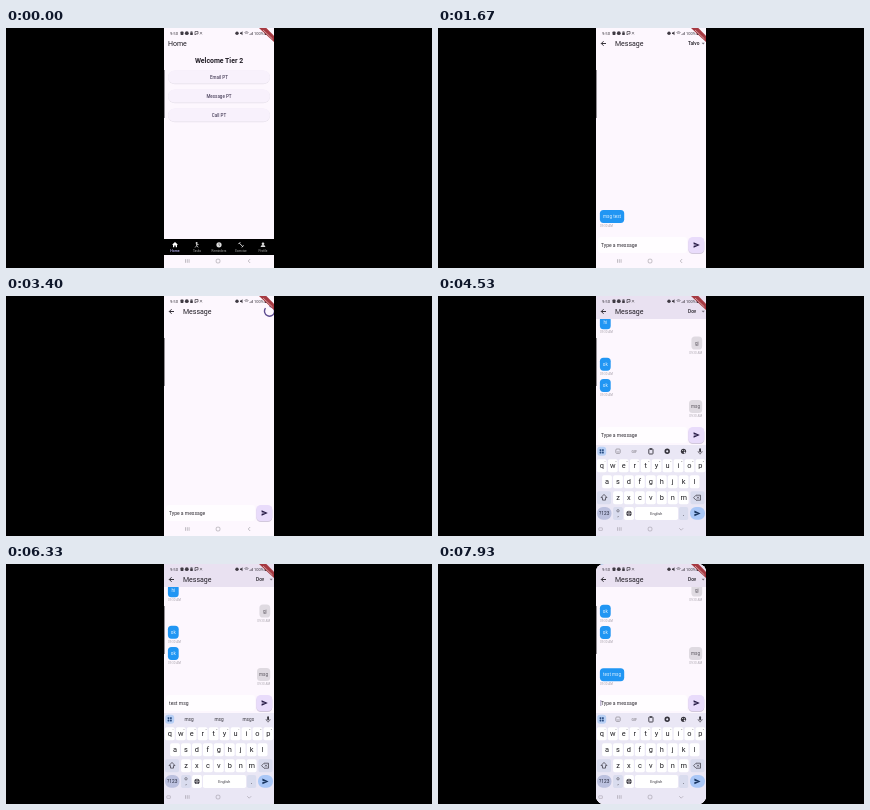
Animation, 426 px wide and 240 px high, one loop 8 s. Source, as an HTML page:

```html
<!DOCTYPE html>
<html lang="en">
<head>
<meta charset="utf-8">
<title>Messaging demo</title>
<style>
html, body { margin: 0; width: 100%; height: 100%; overflow: hidden; background: #000; }
svg { display: block; width: 100%; height: 100%; }
text { font-family: Roboto, Arial, sans-serif; white-space: pre; }
</style>
</head>
<body>
<svg id="stage" viewBox="0 0 426 240"></svg>
<script>
const LOOP = 8000;
const INK = '#211d25', PAGE = '#fdf7fe', BLUE = '#2196f3';
const T = { chat: 900, first: 1150, reload: 3200, second: 3600, keys: 4130, sent: 6850, corners: 7870 };
const TYPING = [[4850, 't'], [5000, 'te'], [5150, 'tes'], [5300, 'test'], [5450, 'test '],
  [5750, 'test m'], [5900, 'test ms'], [6050, 'test msg'], [T.sent, '']];

const rect = (x, y, w, h, fill, r = 0, more = '') =>
  `<rect x="${x}" y="${y}" width="${w}" height="${h}" rx="${r}" fill="${fill}" ${more}/>`;
const circle = (x, y, r, fill, more = '') => `<circle cx="${x}" cy="${y}" r="${r}" fill="${fill}" ${more}/>`;
const shape = (d, fill, more = '') => `<path d="${d}" fill="${fill}" ${more}/>`;
const line = (d, color, w = .8) => shape(d, 'none', `stroke="${color}" stroke-width="${w}"`);
const text = (x, y, s, size, fill = INK, anchor = 'start', weight = 400, more = '') =>
  `<text x="${x}" y="${y}" font-size="${size}" fill="${fill}" text-anchor="${anchor}" font-weight="${weight}" ${more}>${s}</text>`;
const mid = (x, y, s, size, fill, weight) => text(x, y, s, size, fill, 'middle', weight);
const group = (id, body) => `<g id="${id}">${body}</g>`;
const at = (x, y, body) => `<g transform="translate(${x} ${y})">${body}</g>`;

function statusBar() {
  const c = '#3f3a43';
  return text(164, 6.7, '9:50', 4.2, c) +
    rect(174.5, 3.5, 3, 3.4, c, .7) + circle(180.8, 5.2, 1.9, c) + rect(184.2, 4.3, 2.6, 2.7, c, .6) +
    line('M184.8 4.5v-1h1.4v1', c, .5) + line('M189 7v-3.5h3v2.4h-2z', c, .7) + line('M194 4l2 2.4m0-2.4l-2 2.4', c, .5) +
    circle(231, 5.2, 1.7, c) + shape('M234 4.5h1l1.5-1.3v4l-1.5-1.3h-1z', c) +
    line('M238.5 4.5q2-1.6 4 0M239.4 5.6q1.1-.9 2.2 0', c, .6) + line('M244 7v-1m1.2 1v-2m1.2 2v-3', c, .6) +
    text(248, 6.7, '100%', 4, c) + rect(258.6, 3.2, 2, 3.8, c, .5);
}

function systemNav(color, lastIcon) {
  return line('M179.5 231.2v3.6m1.8-3.6v3.6m1.8-3.6v3.6', color, .7) +
    rect(210.2, 231.2, 3.7, 3.7, 'none', 1, `stroke="${color}" stroke-width=".7"`) +
    line(lastIcon, color, .7);
}
const pageNav = () => systemNav('#aaa5ad', 'M244.2 231l-2 2 2 2');

function home() {
  const buttons = ['Email PT', 'Message PT', 'Call PT'].map((label, i) => {
    const y = 42.2 + i * 19;
    return rect(162, y + .6, 102, 13.4, '#e5dfe9', 6.7) + rect(162, y, 102, 13.4, '#f8f1fc', 6.7) +
      mid(213, y + 8.4, label, 4.5, '#4f4660', 500);
  }).join('');
  const icons = [
    shape('M-3 0L0-2.7 3 0H2v2.5H.7V.7H-.7v1.8H-2V0z', '#fff'),
    circle(-.4, -1.7, 1, '#ddd') + line('M-.4-.8v1.8l-1.5 1.7M-.4 1l1.7 1.5M-.4-.2h2', '#ddd'),
    circle(0, 0, 2.6, '#ddd') + line('M0-1.5v1.6l1 .8', '#444', .6),
    line('M-1.6-1.6l3.2 3.2M-2.6-.7l1.9-1.9M.7 2.6l1.9-1.9', '#ddd', 1),
    circle(0, -1, 1.3, '#ddd') + shape('M-2.4 2.2q0-2 2.4-2t2.4 2z', '#ddd')
  ];
  const tabs = ['Home', 'Tasks', 'Reminders', 'Exercise', 'Profile'].map((label, i) =>
    at(169 + i * 22, 216.8, icons[i]) +
    mid(169 + i * 22, 223.8, label, i ? 3.1 : 3.5, i ? '#aaa' : '#b9b2f5', i ? 400 : 500)).join('');
  return rect(158, 0, 110, 240, PAGE) + text(162, 18, 'Home', 7) +
    mid(213, 34.5, 'Welcome Tier 2', 6.9, INK, 700) + buttons +
    rect(158, 211, 110, 16, '#000') + tabs + pageNav();
}

function bubble(y, label, mine, w = 10.8) {
  const x = mine ? 161.9 : 264.2 - w;
  return rect(x, y - 6.5, w, 13, mine ? BLUE : '#dfdae1', 3.6) +
    mid(x + w / 2, y + 1.6, label, 4.6, mine ? '#e3f3ff' : '#57525b') +
    text(mine ? 162 : 264, y + 10.6, '09:30 AM', 3, '#aaa4ae', mine ? 'start' : 'end');
}

function composer() {
  return rect(158, 208, 110, 19, PAGE) + rect(160, 209, 89, 16, '#fffdff', 3) +
    text(163, 218.7, '', 5, '#2b272f', 'start', 400, 'id="draft"') +
    group('caret', rect(162.6, 214, .6, 6, '#62518e')) +
    rect(250.3, 210, 16, 16, '#d2c8dc', 4.5) + rect(250.3, 209, 16, 16, '#e9dcfb', 4.5) +
    shape('M255.6 214.2l6.2 2.8-6.2 2.8v-2.1l3.8-.7-3.8-.7z', '#271b46');
}

function keyboard() {
  const c = '#34323b', soft = '#d9dcee';
  const key = (x, y, w = 9.8, fill = '#fff') => rect(x - w / 2, y - 6.2, w, 13, fill, 1.8);
  const row = (letters, x0, y, step) => [...letters].map((letter, i) =>
    key(x0 + i * step, y) + mid(x0 + i * step, y + 2.4, letter, 7.4, '#1f1e23')).join('');
  const digits = [...'1234567890'].map((d, i) => mid(167 + i * 10.95, 166.3, d, 2.5, '#66636b')).join('');
  const tools = rect(177.8, 153, 4.4, 4.4, 'none', 1, 'stroke="#89858e" stroke-width=".7"') + line('M178.8 155.6q1.2 1.2 2.4 0', '#89858e', .6) +
    mid(196.3, 156.6, 'GIF', 3.7, '#89858e', 500) +
    rect(210.8, 153, 4.2, 5, 'none', .6, `stroke="${c}" stroke-width=".9"`) + rect(211.9, 152.3, 2, 1.4, c) +
    circle(229.2, 155.3, 1.9, 'none', `stroke="${c}" stroke-width="1.6"`) +
    circle(245.5, 155.3, 2.6, c) + circle(244.7, 154.4, .5, '#fff') + circle(246.4, 154.7, .5, '#fff') + circle(246.6, 156.7, .9, '#eeeaf5');
  const words = [183, 213, 242.3].map(x => `<text class="hint" x="${x}" y="157" font-size="4.7" fill="${c}" text-anchor="middle"></text>`).join('');
  return rect(158, 149, 110, 91, '#eae7f5') +
    rect(159.2, 150.8, 9, 9, '#b9d0f5', 3) + [0, 1, 2, 3].map(i => rect(161.6 + i % 2 * 2.4, 153.2 + (i >> 1) * 2.4, 1.8, 1.8, '#294c83', .4)).join('') +
    group('tools', tools) + group('hints', words) +
    rect(261.2, 152.3, 1.8, 3.8, c, .9) + line('M260 155q0 2.2 2.1 2.2t2.1-2.2M262.1 157v1.4', c, .6) +
    row('qwertyuiop', 163.8, 169.5, 10.95) + digits +
    row('asdfghjkl', 169, 185.5, 10.95) + row('zxcvbnm', 180, 201.5, 10.95) +
    key(166, 201.5, 14, soft) + line('M166 198.4l-3 3.2h1.5v2.5h3v-2.5h1.5z', c, .7) +
    key(259.5, 201.5, 14, soft) + line('M258 199.2h4.5v5H258l-2.4-2.5zM259 200.6l2 2m0-2l-2 2', c, .7) +
    rect(159, 211, 14.5, 12.8, '#bcc1df', 6) + mid(166.2, 219, '?123', 4.8, '#23273c') +
    key(180, 217.3, 9.8, soft) + circle(180, 214.8, 1.2, 'none', `stroke="${c}" stroke-width=".5"`) + mid(180, 220.5, ',', 6, c) +
    key(191, 217.3) + circle(191, 217.4, 2.6, c) + line('M188.4 217.4h5.2M191 214.8q-2 2.6 0 5.2q2-2.6 0-5.2', '#fff', .4) +
    key(218.5, 217.3, 43) + mid(218.3, 218.8, 'English', 3.7, c) +
    key(245.6, 217.3, 9.2, soft) + mid(245.6, 219.8, '.', 7, c) +
    rect(252, 211, 15, 12.8, '#a9c7f7', 6) + shape('M256.4 214.6l6.2 2.8-6.2 2.8v-2.1l3.8-.7-3.8-.7z', '#17345f') +
    rect(160.8, 231.8, 3.6, 2.6, 'none', .4, 'stroke="#aaa5b0" stroke-width=".6"') +
    systemNav('#aaa5b0', 'M241.2 232.2l2 2 2-2');
}

function chat() {
  const history = bubble(104.8, 'hi', true) + bubble(125, 'gj', false) + bubble(146.2, 'ok', true) +
    bubble(167.4, 'ok', true) + bubble(188.6, 'msg', false, 13.2);
  return rect(158, 0, 110, 240, PAGE) +
    group('firstThread', bubble(188.4, 'msg test', true, 24.3)) +
    group('secondThread', history + group('newBubble', bubble(209.7, 'test msg', true, 24.3))) +
    rect(158, 0, 110, 23, PAGE, 0, 'id="appBar"') +
    line('M168 15.5h-4.6M165.6 13.2l-2.3 2.3 2.3 2.3', INK, .9) + text(177, 18, 'Message', 7) +
    group('contact', text(250, 17.2, '', 4.8, INK, 'start', 500, 'id="name"') + shape('M263.6 14.7h3.2l-1.6 1.7z', '#77717c')) +
    group('spinner', shape('M263.5 10.2a5 5 0 1 1 -4 2', 'none', 'stroke="#5e4d91" stroke-width="1.4"')) +
    rect(158, 227, 110, 13, PAGE) + pageNav() +
    group('composer', composer()) + group('keyboard', keyboard());
}

const stage = document.getElementById('stage');
stage.innerHTML = `<defs><clipPath id="phone">${rect(158, 0, 110, 240, '#fff', 0, 'id="screen"')}</clipPath></defs>` +
  rect(0, 0, 426, 240, '#000') +
  `<g clip-path="url(#phone)">` + group('home', home()) + group('chat', chat()) + statusBar() +
  shape('M253 0h7.3l7.7 7.7v6.3z', '#a63a42') + line('M257 2l9.5 9', '#d6a5a6', .9) +
  rect(158, 42, .5, 48, '#29262c') + '</g>';

const el = id => document.getElementById(id);
const show = (id, on) => { el(id).style.display = on ? '' : 'none'; };
const move = (id, x, y) => el(id).setAttribute('transform', `translate(${x} ${y})`);
const progress = (t, start, length) => Math.min(1, Math.max(0, (t - start) / length));
const hintNodes = [...document.querySelectorAll('.hint')];

function hintsFor(draft) {
  if (draft === 'test' || draft === 'test ') return ['and', 'for', 'again'];
  return draft.startsWith('test ') ? ['msg', 'msg', 'msgs'] : ['the', 'test', 'text'];
}

function render(t) {
  const loading = t < T.first || (t >= T.reload && t < T.second);
  const second = t >= T.second;
  const rise = 1 - (1 - progress(t, T.keys, 230)) ** 3;
  const sent = t >= T.sent;
  const step = TYPING.filter(([start]) => t >= start).pop();
  const draft = step ? step[1] : '';

  el('screen').setAttribute('rx', t >= T.corners ? 8 : 0);
  show('chat', t >= T.chat);
  el('chat').setAttribute('opacity', progress(t, T.chat, 120));
  show('contact', !loading);
  show('spinner', loading);
  show('firstThread', !loading && !second);
  show('secondThread', second);
  show('newBubble', sent);
  el('name').textContent = second ? 'Dov' : 'Talvo';
  el('appBar').setAttribute('fill', second ? '#e9e1f1' : PAGE);
  el('spinner').setAttribute('transform', `rotate(${(t - 3400) * .36} 263.5 15.2)`);

  // The thread is anchored to the composer, which rides on the keyboard.
  move('composer', 0, -78 * rise);
  move('secondThread', 0, -78 * rise - (sent ? 21 : 0));
  move('keyboard', 0, 91 * (1 - rise));
  show('keyboard', rise > 0);
  show('tools', !draft);
  show('hints', !!draft);
  if (draft) hintsFor(draft).forEach((word, i) => { hintNodes[i].textContent = word; });

  const field = el('draft');
  field.textContent = draft || 'Type a message';
  show('caret', rise > 0 && (t - 650) % 1000 < 500);
  move('caret', draft ? field.getComputedTextLength() + .5 : 0, 0);
}

const began = performance.now();
function tick() {
  render((performance.now() - began) % LOOP);
  requestAnimationFrame(tick);
}
tick();
</script>
</body>
</html>
```
